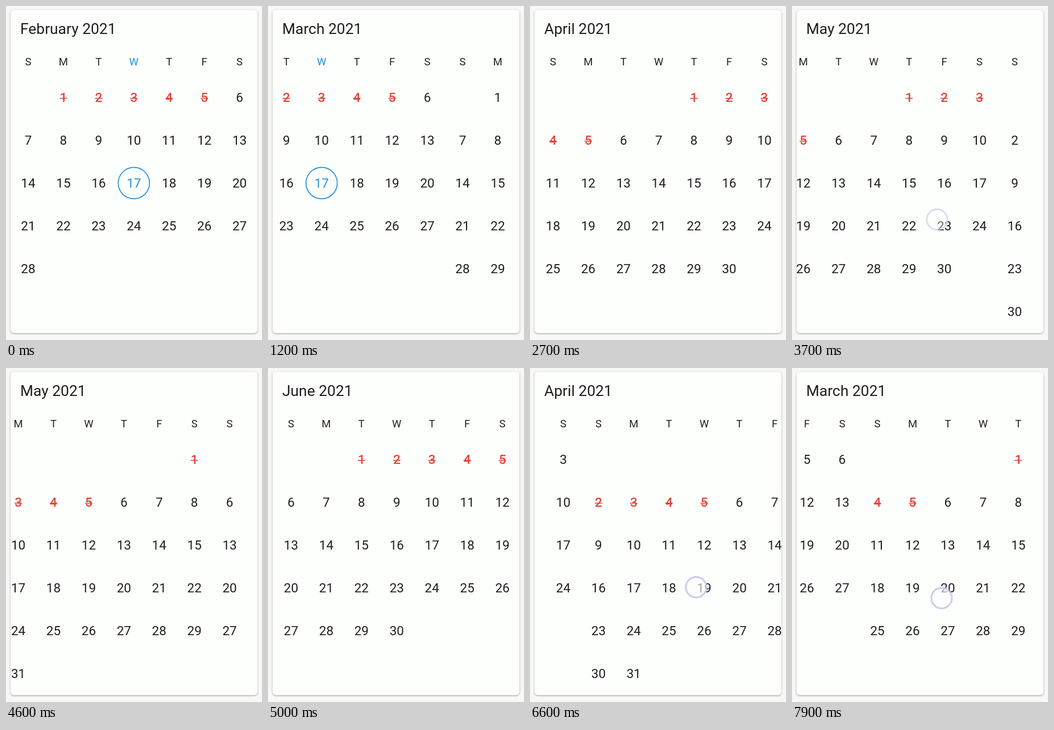
Animation of 450 by 585 pixels, one loop 8000 ms. Source, as an HTML page with a canvas:

```html
<!DOCTYPE html>
<html lang="en">
<head>
<meta charset="utf-8">
<title>Calendar swipe</title>
<style>
  html, body { margin: 0; width: 100%; height: 100%; overflow: hidden; background: #f7f8f6; }
  canvas { display: block; width: 450px; height: 585px; }
</style>
</head>
<body>
<canvas id="stage" width="450" height="585"></canvas>
<script>
const ctx = document.getElementById('stage').getContext('2d');
const LOOP = 8000, STEP = 100, SETTLE = 600;
const PAGE = 433.5, COL = PAGE / 7, FIRST_X = 39, ROW = 75;
const INK = '#1f1f1f', BLUE = '#2390dc', RED = '#e2463b';

// first: weekday of day 1 (Sunday = 0)
const months = [
  { name: 'February', first: 1, days: 28, today: 17 },
  { name: 'March', first: 1, days: 31 },
  { name: 'April', first: 4, days: 30 },
  { name: 'May', first: 6, days: 31 },
  { name: 'June', first: 2, days: 30 }
];

// up: finger release time, drag: drag duration, d: pages dragged at release
const swipes = [
  { from: 0, to: 1, up: 1184, drag: 95, d: 0.2 },
  { from: 1, to: 2, up: 2300, drag: 100, d: 0.196 },
  { from: 2, to: 3, up: 3699, drag: 200, d: 0.18, touch: [255, 374, 0.6] },
  { from: 3, to: 4, up: 4601, drag: 100, d: 0.185 },
  { from: 4, to: 3, up: 5799, drag: 150, d: 0.2 },
  { from: 3, to: 2, up: 6599, drag: 150, d: 0.181, touch: [292, 384, 1] },
  { from: 2, to: 1, up: 7899, drag: 200, d: 0.25, touch: [263, 403, 1] }
];

function progress(s, t) {
  if (t <= s.up) return s.d * Math.max(0, 1 - (s.up - t) / s.drag);
  const left = Math.max(0, 1 - (t - s.up) / SETTLE);
  return 1 - (1 - s.d) * left ** 5;
}

function stateAt(t) {
  const state = { pos: 0, title: 0, current: 0, touch: null };
  for (const s of swipes) {
    if (t < s.up - 210) break;
    const p = progress(s, t), dir = s.to - s.from;
    state.pos = s.from + dir * p;
    if (t > s.up) state.title = s.to;
    if (t > s.up + 370) state.current = s.to;
    if (s.touch && t < s.up + 50) {
      const [x, y, alpha] = s.touch;
      state.touch = [x + dir * Math.max(0, s.d - p) * PAGE, y, alpha];
    }
  }
  return state;
}

function label(str, x, y, size, color = INK, weight = 400, align = 'center') {
  ctx.font = `${weight} ${size}px Roboto, sans-serif`;
  ctx.textAlign = align;
  ctx.fillStyle = color;
  ctx.fillText(str, x, y);
}

function ring(x, y, r, width, color) {
  ctx.beginPath();
  ctx.arc(x, y, r, 0, Math.PI * 2);
  ctx.lineWidth = width;
  ctx.strokeStyle = color;
  ctx.stroke();
}

function cardPath() {
  ctx.beginPath();
  ctx.roundRect(8, 7, 434, 566, 6);
}

function drawCard() {
  ctx.fillStyle = '#f7f8f6';
  ctx.fillRect(0, 0, 450, 585);
  ctx.save();
  ctx.shadowColor = 'rgba(0,0,0,.38)';
  ctx.shadowBlur = 3;
  ctx.shadowOffsetY = 1;
  ctx.fillStyle = '#fdfffc';
  cardPath();
  ctx.fill();
  ctx.restore();
}

function drawMonth(m, left, isCurrent) {
  const colX = c => left + FIRST_X + c * COL;
  const todayCol = m.today ? (m.first + m.today - 1) % 7 : -1;
  [...'SMTWTFS'].forEach((ch, c) =>
    label(ch, colX(c), 104, 18.5, c === todayCol ? BLUE : INK));

  for (let day = 1; day <= m.days; day++) {
    const cell = m.first + day - 1;
    const x = colX(cell % 7), y = 160.3 + Math.floor(cell / 7) * ROW;
    const struck = isCurrent && day <= 5;
    const color = struck ? RED : day === m.today ? BLUE : INK;
    label(day, x, y + 8, 22.5, color, struck ? 500 : 400);
    if (struck) ctx.fillRect(x - 6.5, y + 0.6, 13, 1.6);
    if (day === m.today) ring(x, y - 0.1, 27.5, 1.7, BLUE);
  }
}

function drawTouch([x, y, alpha]) {
  ctx.save();
  ctx.globalAlpha = alpha;
  ctx.beginPath();
  ctx.arc(x, y, 18, 0, Math.PI * 2);
  ctx.fillStyle = 'rgba(253,254,253,.6)';
  ctx.fill();
  ring(x, y, 18, 4, 'rgba(205,205,238,.45)');
  ring(x, y, 18, 1.8, '#c3c5e8');
  ctx.restore();
}

function draw(t) {
  const { pos, title, current, touch } = stateAt(t);
  drawCard();
  label(`${months[title].name} 2021`, 25, 49, 26.4, INK, 400, 'left');
  ctx.save();
  cardPath();
  ctx.clip();
  months.forEach((m, i) => {
    if (Math.abs(i - pos) < 1) drawMonth(m, (i - pos) * PAGE, i === current);
  });
  ctx.restore();
  if (touch) drawTouch(touch);
}

function tick() {
  const t = performance.now() % LOOP;
  draw(Math.floor(t / STEP) * STEP);
  requestAnimationFrame(tick);
}
tick();
</script>
</body>
</html>
```
